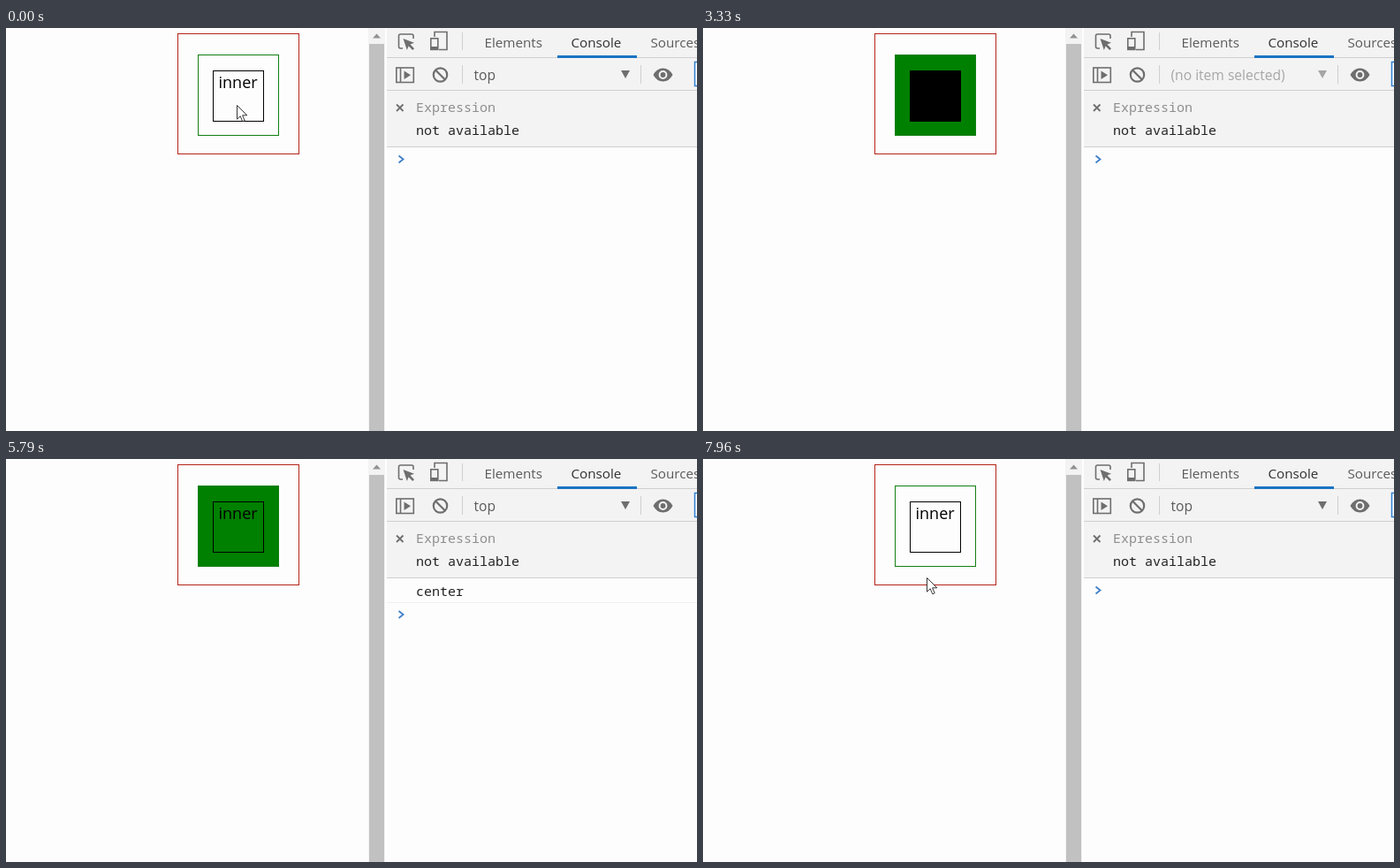
Animation, 782 px wide and 456 px high, one loop 8 s. Source, as an HTML page:

```html
<!DOCTYPE html>
<html lang="en">
<head>
<meta charset="utf-8">
<title>Event bubbling</title>
<style>
html, body { margin: 0; width: 100%; height: 100%; overflow: hidden; background: #fdfdfe; }
svg { display: block; }
.ui { font: 15.2px "Open Sans", "Noto Sans", sans-serif; fill: #5a5a5a; }
.ui .active { fill: #303030; }
.ui #scope { font-size: 15.6px; }
.mono { font: 15px "Noto Sans Mono", monospace; fill: #222; }
.mono .dim { fill: #8e8e8e; }
.icon { fill: none; stroke: #6e6e6e; stroke-width: 1.6; }
.solid { fill: #6e6e6e; stroke: none; }
.rule { fill: #cfcfcf; }
</style>
</head>
<body>
<svg width="782" height="456" viewBox="0 0 782 456">
  <rect width="782" height="456" fill="#fdfdfe"/>

  <!-- nested boxes -->
  <rect x="194.5" y="6.5" width="137" height="136" fill="none" stroke="#b52318"/>
  <rect id="center" x="217.5" y="30.5" width="91" height="91" stroke="#128012"/>
  <rect id="inner" x="234.5" y="48.5" width="57" height="57" stroke="#000"/>
  <text x="240.5" y="68" style="font:18px 'Open Sans','Noto Sans',sans-serif">inner</text>

  <!-- scrollbar -->
  <rect x="410" width="19" height="456" fill="#f3f3f3"/>
  <rect x="411" y="18" width="17" height="438" fill="#c1c1c1"/>
  <path d="M415 11.5L419.5 6.5L424 11.5Z" fill="#929292"/>

  <!-- tools panel -->
  <rect x="431" width="351" height="134" fill="#f3f3f3"/>
  <rect class="rule" x="431" y="33" width="351" height="1"/>
  <rect class="rule" x="431" y="70" width="351" height="1"/>
  <rect class="rule" x="431" y="134" width="351" height="1"/>
  <rect class="rule" x="516" y="5" width="1" height="20"/>
  <rect class="rule" x="516" y="42" width="1" height="21"/>
  <rect class="rule" x="718" y="42" width="1" height="21"/>
  <rect x="624" y="31" width="90" height="3" fill="#1a73c4"/>
  <rect x="779.5" y="38.5" width="20" height="27" fill="#fdfdfe" stroke="#2d7fd0" stroke-width="1.5"/>

  <g class="icon">
    <path d="M449 23H446.5Q444.5 23 444.5 21V9Q444.5 7 446.5 7H459Q461 7 461 9V12"/>
    <path class="solid" d="M449.5 12L462 16.8L457.5 18.6L462 23.2L460.2 25L455.6 20.4L453.8 25Z"/>
    <path d="M485 10V4.5H499V24.5H490"/>
    <rect x="480.8" y="11.8" width="8" height="12.6"/>
    <path d="M481 22.5H489" stroke-width="3"/>
    <rect x="441.8" y="45" width="19.5" height="16.5"/>
    <path d="M446.5 45V61.5"/>
    <path class="solid" d="M450.5 48.5L458 53.2L450.5 58Z"/>
    <circle cx="491.5" cy="53" r="7.7" stroke-width="2.2"/>
    <path d="M486 47.5L497 58.5" stroke-width="2.2"/>
    <path class="solid" d="M732.5 53Q736.5 45.5 743.5 45.5T754.5 53Q750.5 60.5 743.5 60.5T732.5 53Z"/>
    <circle cx="743.5" cy="53" r="3.9" style="stroke:#f3f3f3;stroke-width:2"/>
    <path d="M442 86.5L449.5 94M449.5 86.5L442 94" stroke-width="1.8"/>
  </g>

  <g class="ui">
    <text x="541.5" y="21.5">Elements</text>
    <text class="active" x="639.5" y="21.5">Console</text>
    <text x="729.5" y="21.5">Sources</text>
    <text id="scope" x="529.5" y="58.5">top</text>
  </g>
  <path id="drop" d="M696 48H706L701 57Z"/>

  <g class="mono">
    <text class="dim" x="464" y="95">Expression</text>
    <text x="464" y="121">not available</text>
    <g id="rows"></g>
  </g>
  <path id="prompt" d="M444.5 -4L449.5 0L444.5 4" fill="none" stroke="#3f7fc8" stroke-width="1.8"/>

  <path id="cursor" d="M.5 .5V16.2L4.2 12.8L6.8 18.8L9.2 17.8L6.6 11.8H11.8Z" fill="#fff" stroke="#222" stroke-width=".9"/>
</svg>
<script>
const LOOP = 8000;
const $ = id => document.getElementById(id);

// Pointer tip: [time, x, y]; it waits off stage between visits
const path = [
  [0, 261, 87], [2080, 261, 87], [2290, -20, 106],
  [3740, -20, 104], [3750, 28, 102], [4130, 184, 94], [4320, 210, 112],
  [4500, 222, 124], [4580, 222, 124], [4630, 229, 112],
  [4800, 229, 112], [4830, 232, 112], [5630, 232, 112], [5790, -20, 68],
  [6920, -20, 76], [7250, 130, 104], [7450, 222, 130], [7630, 260, 140],
  [7670, 260, 140], [7790, 243, 141], [7960, 253, 134], [LOOP, 253, 134]
];

function tipAt(t) {
  const i = path.findIndex(p => p[0] > t);
  const [t0, x0, y0] = path[i - 1], [t1, x1, y1] = path[i];
  const k = (t - t0) / (t1 - t0);
  return [x0 + (x1 - x0) * k, y0 + (y1 - y0) * k];
}

const within = (t, a, b) => t >= a && t < b;

function logAt(t) {
  if (within(t, 680, 3330)) return t < 730 ? ["inner"] : ["inner", "center"];
  return within(t, 5040, 6830) ? ["center"] : [];
}

let shown = "";
function setRows(names) {
  if (names.join() === shown) return;
  shown = names.join();
  $("rows").innerHTML = names.map((name, i) =>
    `<text x="464" y="${155 + 27 * i}">${name}</text>` +
    `<rect x="431" y="${162 + 26 * i}" width="351" height="1" fill="#f0f0f0"/>`).join("");
}

function draw(t) {
  const first = within(t, 630, 3370);
  const second = within(t, 5000, 6880);
  const reload = within(t, 3330, 3370) || within(t, 6830, 6880);
  const names = logAt(t);

  $("center").setAttribute("fill", first || second ? "#008000" : "none");
  $("inner").setAttribute("fill", first ? "#000" : "none");
  $("scope").textContent = reload ? "(no item selected)" : "top";
  $("scope").style.fill = reload ? "#a6a6a6" : "";
  $("drop").setAttribute("fill", reload ? "#a6a6a6" : "#6e6e6e");
  setRows(names);
  const y = [148.5, 176, 203][names.length];
  $("prompt").setAttribute("transform", `translate(0 ${y})`);
  const [px, py] = tipAt(t);
  $("cursor").setAttribute("transform", `translate(${Math.round(px)} ${Math.round(py)})`);
}

const start = performance.now();
function tick() {
  draw((performance.now() - start) % LOOP);
  requestAnimationFrame(tick);
}
draw(0);
requestAnimationFrame(tick);
</script>
</body>
</html>
```
